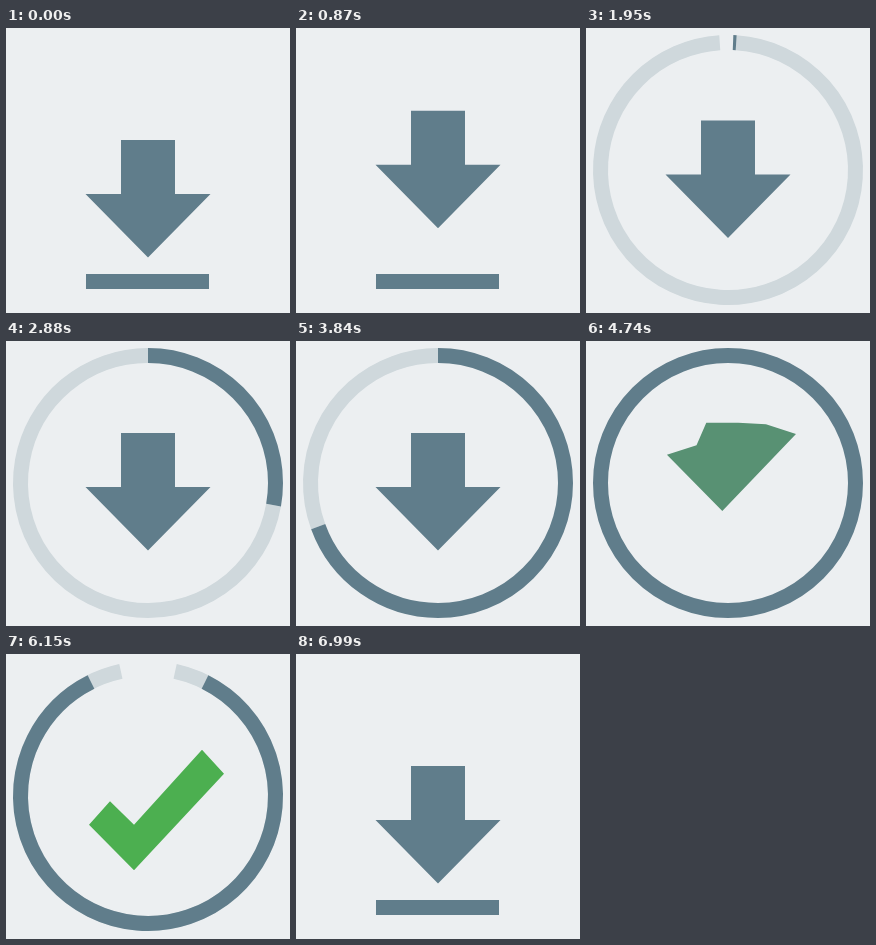
Recreate the animation shown at these times as an HTML page with a canvas. Size 284x285 px, loop 7.35 s.

```html
<!DOCTYPE html>
<html>
<head>
<meta charset="utf-8">
<title>Download</title>
<style>
  html, body { margin: 0; width: 100%; height: 100%; overflow: hidden; background: #eceff1; }
  canvas { display: block; }
</style>
</head>
<body>
<canvas id="stage" width="284" height="285"></canvas>
<script>
const ctx = document.getElementById('stage').getContext('2d');
const LOOP = 7350, TICK = 30;
const CX = 142, CY = 142, R = 127.5;
const SLATE = [96, 125, 139], GREEN = [76, 175, 80], PALE = [207, 216, 220];
const BAR_SPAN = 57.7;

// Matching outlines, both starting at the bottom tip.
const ARROW = [[142, 229.5], [204.5, 166], [169, 166], [169, 112], [115, 112], [115, 166], [79.5, 166]];
const CHECK = [[128, 231.5], [218, 135], [196, 111], [128, 186], [128, 186], [104, 162.5], [83, 186]];

const rgb = c => `rgb(${c.map(Math.round).join()})`;
const mix = (a, b, k) => a.map((v, i) => v + (b[i] - v) * k);
const span = (t, from, to) => Math.min(1, Math.max(0, (t - from) / (to - from)));
const quint = x => x < .5 ? 16 * x ** 5 : 1 - 16 * (1 - x) ** 5;
const cubic = x => x < .5 ? 4 * x ** 3 : 1 - 4 * (1 - x) ** 3;
const ease = (t, from, to) => quint(span(t, from, to));
const easeOut = x => 1 - (1 - x) ** 2;

function iconShift(t) {
  if (t < 780) return -50 * easeOut(span(t, 450, 780));
  if (t < 960) return -50 + 83 * span(t, 780, 960) ** 2;
  if (t < 2280) {
    const s = t - 960;
    return -20 + 53 * Math.exp(-.0045 * s) * Math.cos(2 * Math.PI * s / 498);
  }
  if (t < 4980) return -20 - 67 * easeOut(span(t, 4600, 4980));
  if (t < 5146) return -87 + 67 * span(t, 4980, 5146) ** 2;
  if (t < 5850) {
    const x = span(t, 5146, 5360);
    return -20 - 32 * x * (1 - x);
  }
  return -20 * (1 - ease(t, 5850, 6550));
}

function drawIcon(t) {
  const k = cubic(span(t, 4600, 4900)) - cubic(span(t, 6170, 6530));
  const dy = iconShift(t);
  ctx.fillStyle = rgb(mix(SLATE, GREEN, k));
  ctx.beginPath();
  ARROW.forEach((p, i) => {
    const [x, y] = mix(p, CHECK[i], k);
    ctx.lineTo(x, y + dy);
  });
  ctx.fill();
}

// Angles in degrees, clockwise from the top.
function arc(from, to, color) {
  if (to - from < .05) return;
  const rad = a => (a - 90) * Math.PI / 180;
  ctx.strokeStyle = rgb(color);
  ctx.beginPath();
  ctx.arc(CX, CY, R, rad(from), rad(to));
  ctx.stroke();
}

// bend: 0 is straight, 1 follows the ring.
function drawBar(bend) {
  const k = Math.abs(bend) < 1e-3 ? 1e-3 : bend;
  const half = (61.5 + 2.7 * k) / R;
  ctx.strokeStyle = rgb(SLATE);
  ctx.beginPath();
  for (let u = -1; u <= 1.001; u += .05) {
    const a = u * half * k;
    ctx.lineTo(CX - .5 * (1 - k) + R * Math.sin(a) / k,
               253.5 + 16 * k - R * (1 - Math.cos(a)) / k);
  }
  ctx.stroke();
}

function drawRing(t) {
  if (t < 960) return drawBar(span(iconShift(t), 17, 33));
  if (t < 2280) {
    const mid = 180 + 360 * ease(t, 947, 2149);
    const length = BAR_SPAN + (360 - BAR_SPAN) * ease(t, 967, 2299);
    const start = mid - length / 2;
    const dark = length * (1 - ease(t, 1320, 2098));
    arc(start + dark, start + length, PALE);
    return arc(start, start + dark, SLATE);
  }
  if (t < 5850) {
    const steps = Math.min(36, Math.floor((t - 2214) / 64));
    arc(steps * 10, 360, PALE);
    return arc(0, steps * 10, SLATE);
  }
  if (t < 6575) {
    const pale = 180 * ease(t, 5915, 6615);
    const dark = (180 - BAR_SPAN / 2) * ease(t, 5862, 6572);
    arc(pale, 360 - pale, PALE);
    return arc(dark, 360 - dark, SLATE);
  }
  const x = (t - 6575) / 800;
  drawBar(t < 6990 ? 2 ** (-10 * x) * Math.cos(2 * Math.PI * x / .3) : 0);
}

const begin = performance.now();
function frame() {
  const elapsed = (performance.now() - begin) % LOOP;
  const t = Math.floor(elapsed / TICK) * TICK;
  ctx.fillStyle = '#eceff1';
  ctx.fillRect(0, 0, 284, 285);
  ctx.lineWidth = 15;
  drawRing(t);
  drawIcon(t);
  requestAnimationFrame(frame);
}
frame();
</script>
</body>
</html>
```
